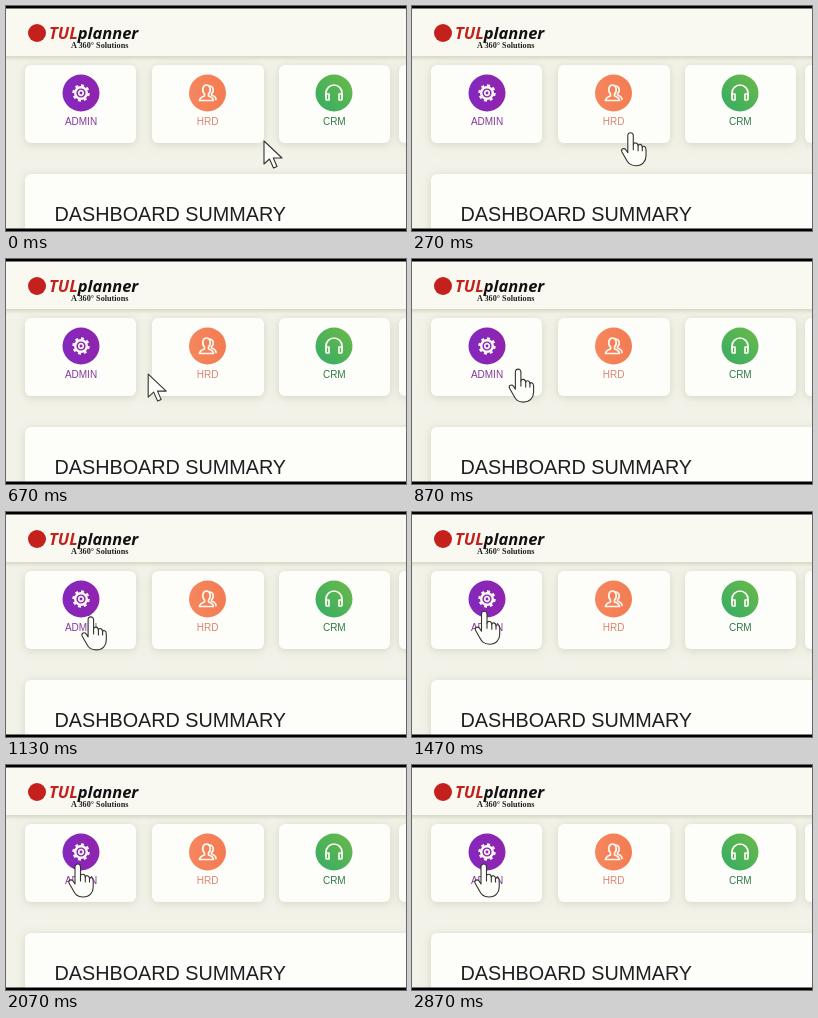
Recreate the animation shown at these times as an HTML page. Size 400 by 225 pixels, loop 3340 ms.

```html
<!DOCTYPE html>
<html lang="en">
<head>
<meta charset="utf-8">
<title>Dashboard</title>
<style>
html, body { margin: 0; width: 100%; height: 100%; overflow: hidden; background: #000; }
svg { display: block; width: 100vw; height: 100vh; }
text { font-family: "Liberation Sans", Arial, sans-serif; }
.label { font-size: 10px; text-anchor: middle; }
.card { fill: #fdfdfa; filter: url(#soft); }
.icon { fill: none; stroke: #fdfaf2; stroke-width: 1.7; stroke-linecap: round; stroke-linejoin: round; }
.cursor { fill: #fdfdfa; stroke: #33332f; stroke-width: 1.1; stroke-linejoin: round; stroke-linecap: round; }
</style>
</head>
<body>
<svg viewBox="0 0 400 225">
  <defs>
    <filter id="soft" x="-30%" y="-30%" width="160%" height="170%">
      <feDropShadow dx="0" dy="1.5" stdDeviation="4.5" flood-color="#8e8e78" flood-opacity=".3"/>
    </filter>
    <linearGradient id="edge" x1="0" y1="0" x2="0" y2="1">
      <stop offset="0" stop-color="#d8d8c8"/>
      <stop offset="1" stop-color="#f2f2e8"/>
    </linearGradient>
    <linearGradient id="purple">
      <stop offset="0" stop-color="#8428be"/>
      <stop offset="1" stop-color="#9024ae"/>
    </linearGradient>
    <linearGradient id="orange">
      <stop offset="0" stop-color="#f6865e"/>
      <stop offset="1" stop-color="#f37c52"/>
    </linearGradient>
    <linearGradient id="green" x1="0" y1="1" x2="1" y2="0">
      <stop offset="0" stop-color="#34ac66"/>
      <stop offset="1" stop-color="#6cba48"/>
    </linearGradient>
  </defs>

  <rect width="400" height="225" fill="#f2f2e8"/>
  <rect width="400" height="50" fill="#f9f9f2"/>
  <rect y="50" width="400" height="5" fill="url(#edge)"/>

  <circle cx="31" cy="27" r="9" fill="#c4201c"/>
  <text x="43" y="33" font-size="16.5" font-weight="700" font-style="italic" fill="#111" style="font-family:'Open Sans',sans-serif"><tspan fill="#c4201c">TUL</tspan>planner</text>
  <text x="65" y="42" font-size="8.2" font-weight="700" fill="#222" style="font-family:'Liberation Serif',serif">A 360° Solutions</text>

  <rect class="card" x="19" y="59" width="111" height="78" rx="6"/>
  <rect class="card" x="146" y="59" width="112" height="78" rx="6"/>
  <rect class="card" x="273" y="59" width="111" height="78" rx="6"/>
  <rect class="card" x="393" y="59" width="111" height="78" rx="6"/>
  <rect class="card" x="19" y="168" width="420" height="90" rx="6"/>

  <circle cx="75" cy="87" r="18.5" fill="url(#purple)"/>
  <g class="icon" transform="translate(75 87)">
    <circle r="5.8" stroke-width="2.4"/>
    <circle r="7.5" stroke-width="2.4" stroke-linecap="butt" pathLength="16" stroke-dasharray="1 1"/>
    <circle r="2.3" stroke-width="1.7"/>
  </g>
  <text class="label" x="75" y="119" fill="#853a9c">ADMIN</text>

  <circle cx="201.5" cy="87" r="18.5" fill="url(#orange)"/>
  <g class="icon" transform="translate(201.5 87)">
    <path d="M-3 1C-6-2-5-8-1-8S4-2 1 1V3C4 4 6 5 6 7.5H-8C-8 5-6 4-3 3Z"/>
    <path d="M2-7C6-7 7-2 4 1V2C7 3 8.5 4 8.5 6.5"/>
  </g>
  <text class="label" x="201.7" y="119" fill="#dd8672">HRD</text>

  <circle cx="328" cy="87" r="18.5" fill="url(#green)"/>
  <g class="icon" transform="translate(328 87)">
    <path d="M-8 3V0A8 8 0 0 1 8 0V3"/>
    <path d="M-8 1H-5V7H-7Q-8 7-8 6ZM8 1H5V7H7Q8 7 8 6Z"/>
  </g>
  <text class="label" x="328.3" y="119" fill="#337a48">CRM</text>

  <text x="48.5" y="215" font-size="19.8" fill="#1f1f22">DASHBOARD SUMMARY</text>

  <g id="arrow" class="cursor">
    <path d="M0 0V23L5.5 18L9.5 27L13 25.5L9.3 17H18Z"/>
  </g>
  <g id="hand" class="cursor">
    <path d="M-3 3C-3-1 2.5-1 2.5 3V12C3 9.5 7 9.5 7.3 13C8 11 11.2 11 11.5 14.5C12.5 12.8 15.2 13.5 15.2 17V23C15.2 28 12 33 5 33C-1 33-3 30-5 26L-9 19C-10 16-6.5 15-5 17L-3 20Z"/>
    <path d="M2.5 12V17M7.3 13V18M11.5 14.5V18" fill="none"/>
  </g>

  <rect width="400" height="2.5" fill="#000"/>
  <rect y="222.5" width="400" height="2.5" fill="#000"/>
</svg>
<script>
const LOOP = 3340, TICK = 200 / 3;
const arrow = document.getElementById("arrow");
const hand = document.getElementById("hand");

// time, x, y, speed x, speed y
const path = [
  [0, 258, 135, -.1, -.03],
  [530, 169.6, 119, -.18, -.027],
  [870, 106, 110, -.12, -.02],
  [1130, 85.3, 105, -.055, -.018],
  [1470, 72.5, 99.2, -.01, -.004],
  [1600, 72, 99, 0, 0]
];

function hermite(a, b, va, vb, u, dt) {
  const u2 = u * u, u3 = u2 * u;
  return (2 * u3 - 3 * u2 + 1) * a + (3 * u2 - 2 * u3) * b
    + (u3 - 2 * u2 + u) * dt * va + (u3 - u2) * dt * vb;
}

function position(t) {
  const i = path.findIndex(p => p[0] > t);
  if (i < 0) return path[path.length - 1].slice(1, 3);
  const a = path[i - 1], b = path[i], dt = b[0] - a[0];
  const u = (t - a[0]) / dt;
  return [1, 2].map(k => hermite(a[k], b[k], a[k + 2], b[k + 2], u, dt));
}

function draw(now) {
  const t = Math.floor((now % LOOP + 5) / TICK) * TICK;
  const [x, y] = position(t);
  const overCard = x < 130 || (x > 146 && x < 257);
  const shown = overCard ? hand : arrow;
  hand.style.display = overCard ? "" : "none";
  arrow.style.display = overCard ? "none" : "";
  shown.setAttribute("transform", `translate(${x.toFixed(1)} ${y.toFixed(1)})`);
}

let start;
function loop(now) {
  start ??= now;
  draw(now - start);
  requestAnimationFrame(loop);
}
draw(0);
requestAnimationFrame(loop);
</script>
</body>
</html>
```
